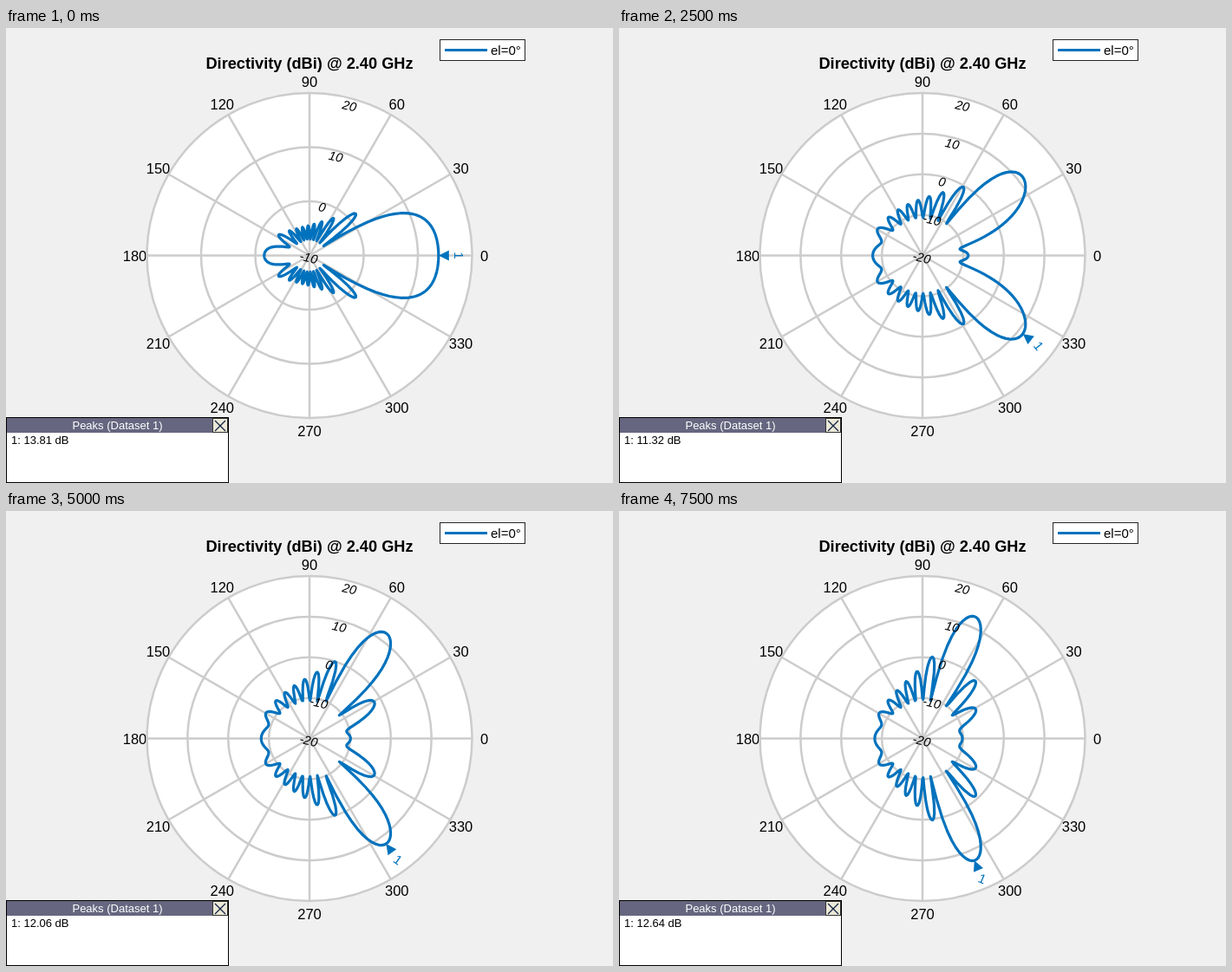
Animation of 700 by 525 pixels, one loop 8000 ms. Source, as an HTML page:

```html
<!DOCTYPE html>
<html>
<head>
<meta charset="utf-8">
<style>
html, body { margin: 0; width: 100%; height: 100%; overflow: hidden; background: #f0f0f0; }
svg { display: block; font-family: "Liberation Sans", Arial, sans-serif; }
.mid { text-anchor: middle; }
.grid { fill: none; stroke: #ccc; stroke-width: 2.5; }
.angle { font-size: 16.5px; }
.level { font-size: 14.5px; font-style: italic; }
.small { font-size: 13px; }
</style>
</head>
<body>
<svg width="700" height="525" viewBox="0 0 700 525">
  <circle cx="350" cy="262.5" r="187.5" fill="#fff"/>
  <g id="grid"></g>
  <g id="rings"></g>
  <path id="curve" fill="none" stroke="#0072bd" stroke-width="3.2" stroke-linejoin="round"/>
  <g id="levels"></g>
  <g fill="#0072bd">
    <path id="arrow" d="M0 0L12 -6V6Z"/>
    <text id="mark" class="mid" font-size="15" y="5">1</text>
  </g>
  <text class="mid" x="350" y="47" font-size="18.2" font-weight="bold">Directivity (dBi) @ 2.40 GHz</text>
  <rect x="500.5" y="13.5" width="98" height="24" fill="#fff" stroke="#262626"/>
  <path d="M506 25.5H555" stroke="#0072bd" stroke-width="3.2"/>
  <text x="559" y="31" font-size="15">el=0°</text>
  <rect x=".5" y="449.5" width="256" height="75" fill="#fff" stroke="#000"/>
  <rect x="1" y="450" width="255" height="17" fill="#666680"/>
  <text class="mid small" x="128.5" y="463" fill="#fff">Peaks (Dataset 1)</text>
  <rect x="238.5" y="450.5" width="17" height="16" fill="#ece9d8" stroke="#333"/>
  <path d="M241 453L253 465M253 453L241 465" stroke="#124" stroke-width="1.3"/>
  <text id="peak" class="small" x="6" y="480"></text>
</svg>
<script>
const CX = 350, CY = 262.5, R = 187.5, TOP = 20, STEP = 500;
const gains = [13.81, 11.9, 11.3, 11.08, 11.19, 11.32, 11.46, 11.61, 11.75, 11.9,
  12.06, 12.21, 12.34, 12.46, 12.56, 12.64];
const $ = id => document.getElementById(id);
const rad = deg => deg * Math.PI / 180;
const at = (r, deg) => [CX + r * Math.cos(rad(deg)), CY - r * Math.sin(rad(deg))];

let grid = "", names = "";
for (let a = 0; a < 360; a += 30) {
  const [x, y] = at(201.5, a);
  grid += `<path class="grid" d="M${CX} ${CY}L${at(R, a)}"/>`;
  names += `<text class="mid angle" x="${x}" y="${y + 6.5}">${a}</text>`;
}
$("grid").innerHTML = grid + names;

function setScale(low) {
  let rings = "", levels = "";
  for (let v = low; v <= TOP; v += 10) {
    const t = (v - low) / (TOP - low);
    rings += `<circle class="grid" cx="${CX}" cy="${CY}" r="${R * t}"/>`;
    levels += `<text class="mid level" y="5" transform="translate(${349 + 47 * t} ${265 - 175 * t}) rotate(13)">${v}</text>`;
  }
  $("rings").innerHTML = rings;
  $("levels").innerHTML = levels;
}

// Uniform 13-element line array steered by a phase step, over a power floor
function pattern(k) {
  const N = 13, length = 5.15, early = Math.exp(-k);
  const steer = .987 - .0392 * k + .033 * early;
  const dip = .5 * (1 - early), floor = .085 + .115 * early;
  const beam = c => {
    const x = Math.PI * length / N * (c - steer);
    const field = Math.sin(N * x) / (N * Math.sin(x)) || 1;
    return field * field * (1 - dip * c * c);
  };
  const cosines = Array.from({ length: 181 }, (_, a) => Math.cos(rad(a)));
  const power = cosines.map(beam);
  const max = Math.max(...power), gain = 10 ** (gains[k] / 10);
  const db = power.map((p, a) => {
    const c = cosines[a], base = floor * (c < 0 ? 1 + .5 * c ** 8 : 1);
    return 10 * Math.log10((gain - base) * p / max + base);
  });
  return { db, angle: power.indexOf(max) };
}

function draw(k) {
  const low = k < 3 ? -10 : -20;
  const radius = v => Math.max(0, (v - low) / (TOP - low) * R);
  const { db, angle } = pattern(k);
  const points = [];
  for (let a = -180; a <= 180; a++) points.push(at(radius(db[Math.abs(a)]), a));
  setScale(low);
  $("curve").setAttribute("d", "M" + points.join("L") + "Z");
  const tip = radius(gains[k]);
  $("arrow").setAttribute("transform", `translate(${at(tip, -angle)}) rotate(${angle})`);
  $("mark").setAttribute("transform", `translate(${at(tip + 23, -angle)}) rotate(${90 - angle})`);
  $("peak").textContent = `1: ${gains[k]} dB`;
}

let shown = -1;
const start = performance.now();
function tick() {
  const k = Math.floor((performance.now() - start) / STEP) % gains.length;
  if (k !== shown) draw(shown = k);
  requestAnimationFrame(tick);
}
tick();
</script>
</body>
</html>
```
